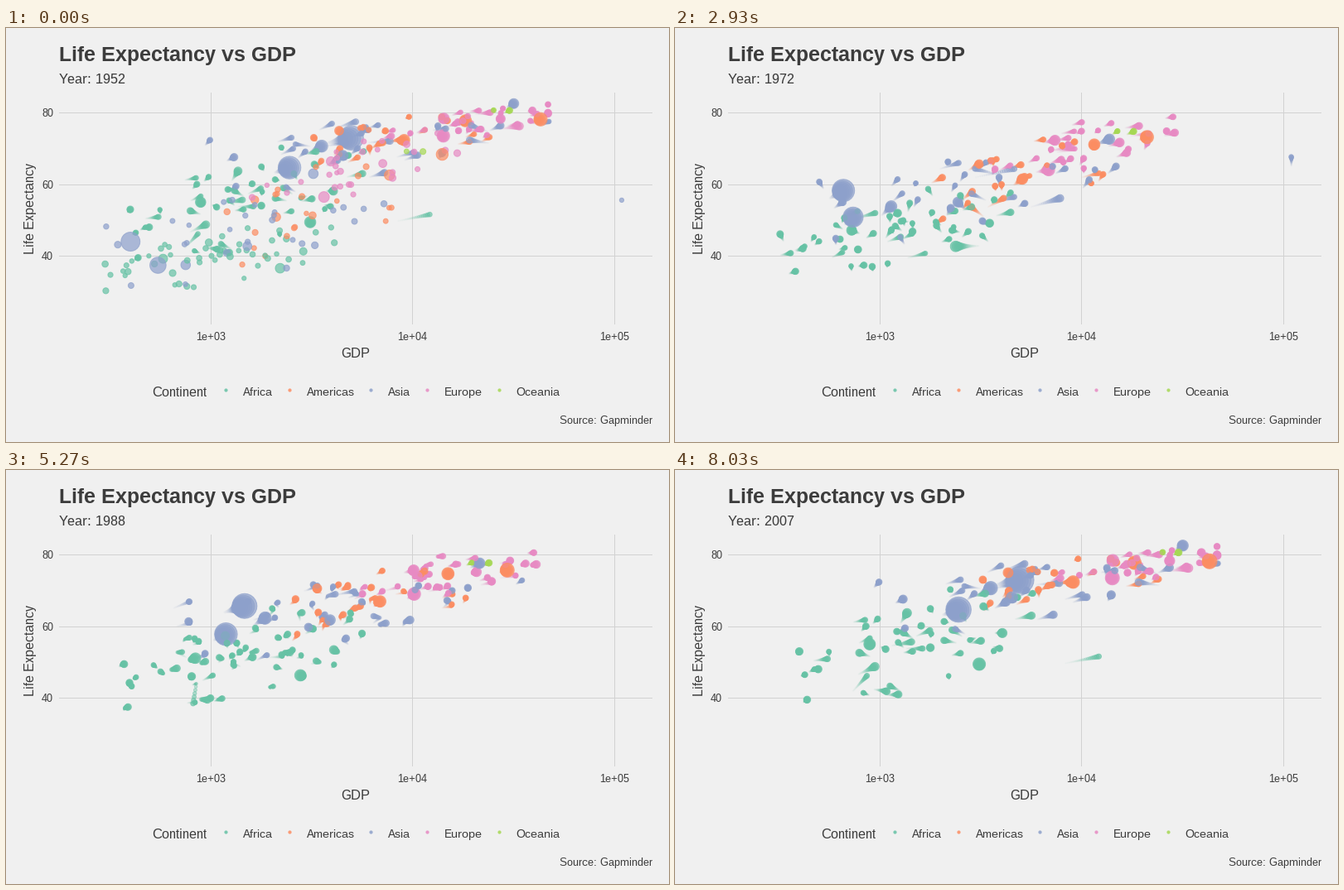
A matplotlib script for the animation above (10 s loop, 800x500 px).

```python
import numpy as np
import matplotlib.pyplot as plt
from matplotlib.animation import FuncAnimation
from matplotlib.collections import PathCollection
from matplotlib.colors import to_rgb
from matplotlib.path import Path
from matplotlib.transforms import IdentityTransform

plt.rcParams.update({"font.family": "Liberation Sans",
                     "text.hinting": "default", "text.hinting_factor": 1})
DPI = 100
PX = 72 / DPI                      # points per pixel
FRAMES, LAST, WAKE = 300, 239, 27  # LAST is the final moving frame
BACKGROUND, GRID, INK = "#F0F0F0", "#D2D2D2", "#3C3C3C"
ALPHA = 0.7
BEND = 0.7                         # growth is fast at first, then slows
COLORS = {"Africa": "#66C2A5", "Americas": "#FC8D62", "Asia": "#8DA0CB",
          "Europe": "#E78AC3", "Oceania": "#A6D854"}

YEARS = np.arange(1952, 2008, 5)
PROGRESS = np.linspace(0, 1, len(YEARS))
rng = np.random.default_rng(11)


def grow(ends, bend=BEND):
    start, end = ends
    return start + (end - start) * PROGRESS ** bend


def standard_scores(count, limit=1.8):
    z = rng.normal(size=count)
    return np.clip((z - z.mean()) / z.std(), -limit, limit)


def wander(amount):
    return rng.normal(0, amount, len(YEARS))


def giant(continent, pop, gdp, life, gdp_bend):
    """A populous country, given by its first and last state."""
    return (continent, grow(np.log10(gdp), gdp_bend), grow(life), grow(pop, 1))


def outlier(continent, *points):
    """A country that leaves the cloud: (year, GDP, life expectancy)."""
    when, gdp, life = np.transpose(points)
    return (continent, np.interp(YEARS, when, np.log10(gdp)),
            np.interp(YEARS, when, life), grow((1, 4), 1))


def cloud(continent, count, gdp, life, gdp_spread, life_spread):
    """Random countries around a continent's trend; the rich live longer."""
    wealth = standard_scores(count)
    health = np.clip(0.65 * wealth + 0.75 * standard_scores(count), -1.8, 1.8)
    for w, h in zip(wealth, health):
        log_gdp = grow(np.log10(gdp)) + gdp_spread * (w + wander(0.1))
        log_gdp = np.minimum(log_gdp, 4.67)
        years = grow(life) + grow(life_spread, 1) * (h + wander(0.06))
        ceiling = 79 + 5 * (log_gdp - 4)
        pop = 6 * np.exp(rng.normal(0, 1)) * 2.2 ** PROGRESS
        yield continent, log_gdp, np.minimum(years, ceiling), pop


countries = [
    giant("Asia", (556, 1318), (400, 4959), (44, 73), 1.6),
    giant("Asia", (372, 1110), (547, 2452), (37.4, 64.7), 1.6),
    giant("Asia", (82, 224), (750, 3541), (37.5, 70.7), 1.3),
    giant("Asia", (86, 127), (3217, 31656), (63, 82.6), 0.45),
    giant("Americas", (157, 301), (13990, 42952), (68.4, 78.2), 1),
    giant("Americas", (57, 190), (2109, 9066), (50.9, 72.4), 0.5),
    outlier("Asia", (1952, 108400, 55.6), (1972, 109300, 67.7),
            (1982, 31400, 71.3), (2007, 47300, 77.6)),
    outlier("Africa", (1952, 493, 40), (1987, 848, 44), (1992, 737, 23.6),
            (1997, 590, 36), (2007, 863, 46.2)),
    outlier("Africa", (1952, 376, 34.5), (1992, 1132, 47.5),
            (2002, 7703, 49.3), (2007, 12154, 51.6)),
    *cloud("Africa", 50, (1050, 1500), (39.5, 55.5), 0.31, (5, 9)),
    *cloud("Americas", 23, (3050, 8000), (53, 73.5), 0.25, (8.5, 4)),
    *cloud("Asia", 28, (1500, 5300), (47, 71), 0.4, (8.5, 6.5)),
    *cloud("Europe", 30, (5300, 21500), (64.5, 77.7), 0.25, (5.5, 2.7)),
    *cloud("Oceania", 2, (10300, 27500), (69.2, 80.7), 0.04, (0.2, 0.6)),
]
rng.shuffle(countries)
continents, gdp_tracks, life_tracks, pop_tracks = zip(*countries)


def per_frame(tracks):
    """Interpolate yearly tracks linearly; result is (frame, country)."""
    moments = np.linspace(YEARS[0], YEARS[-1], LAST + 1)
    return np.array([np.interp(moments, YEARS, t) for t in tracks]).T


rgb = np.array([to_rgb(COLORS[c]) for c in continents])
xs = 247.2 + 243.6 * (per_frame(gdp_tracks) - 3)
ys = 102.5 + 4.32 * (80 - per_frame(life_tracks))
diameters = 4.5 + 28.5 * per_frame([np.sqrt(p / 1318) for p in pop_tracks])

# Wake copies, oldest first; those beyond two thirds cannot be seen.
lags = np.arange(2 * WAKE // 3, 0, -1)
falloff = (1 - lags / WAKE) ** 3
wake_rgba = np.column_stack([np.tile(rgb, (len(lags), 1)),
                             np.repeat(ALPHA * falloff, len(rgb))])
head_rgba = np.column_stack([rgb, np.full(len(rgb), ALPHA)])

fig = plt.figure(figsize=(8, 5), dpi=DPI, facecolor=BACKGROUND)
ax = fig.add_axes([0, 0, 1, 1])
ax.set(xlim=(0, 800), ylim=(500, 0))
ax.axis("off")


def label(x, y, text, size, **kwargs):
    return ax.text(x, y, text, fontsize=size * PX, color=INK,
                   va="baseline", **kwargs)


def grid_line(x, y):
    ax.plot(x, y, color=GRID, lw=PX, zorder=1, snap=False,
            solid_capstyle="butt")


def disc_layer(rgba, zorder):
    layer = PathCollection([Path.unit_regular_polygon(24)], sizes=[1],
                           facecolors=rgba, edgecolors=rgba, linewidths=PX,
                           offsets=np.zeros((len(rgba), 2)),
                           offset_transform=ax.transData, zorder=zorder)
    layer.set_transform(IdentityTransform())
    return ax.add_collection(layer, autolim=False)


def place(layer, x, y, diameter):
    layer.set_offsets(np.column_stack([np.ravel(x), np.ravel(y)]))
    # The unit polygon has radius 1, and sizes are squared points.
    layer.set_sizes((np.ravel(diameter) / 2 * PX) ** 2, dpi=DPI)


for x, text in [(247.5, "1e+03"), (490.5, "1e+04"), (734.5, "1e+05")]:
    grid_line([x, x], [78, 358])
    label(x, 377, text, 13, ha="center")
for y, text in [(102.5, "80"), (189.5, "60"), (275.5, "40")]:
    grid_line([64, 780], [y, y])
    label(57, y + 4.5, text, 13, ha="right")

label(64, 40, "Life Expectancy vs GDP", 25, weight="bold")
subtitle = label(64, 67, "", 17)
label(421.5, 398, "GDP", 16, ha="center")
label(34, 218, "Life Expectancy", 16, ha="center", rotation=90,
      rotation_mode="anchor")
label(780, 478, "Source: Gapminder", 13, ha="right")
label(176, 445, "Continent", 16)
for x, (name, color) in zip([265, 342, 440, 508, 595], COLORS.items()):
    ax.scatter([x], [437], s=(4.2 * PX) ** 2, color=color, alpha=0.85, lw=0)
    label(x + 20.5, 444, name, 14)

wake = disc_layer(wake_rgba, 2)
heads = disc_layer(head_rgba, 3)


def update(index):
    frame = min(index, LAST)
    past = (frame - lags) % (LAST + 1)
    place(wake, xs[past], ys[past],
          1 + (diameters[past] - 1) * falloff[:, None])
    place(heads, xs[frame], ys[frame], diameters[frame])
    subtitle.set_text(f"Year: {round(1952 + 55 * frame / LAST)}")
    return wake, heads, subtitle


anim = FuncAnimation(fig, update, frames=FRAMES, interval=10000 / FRAMES,
                     repeat=True, repeat_delay=0, blit=False)
plt.show()
```
